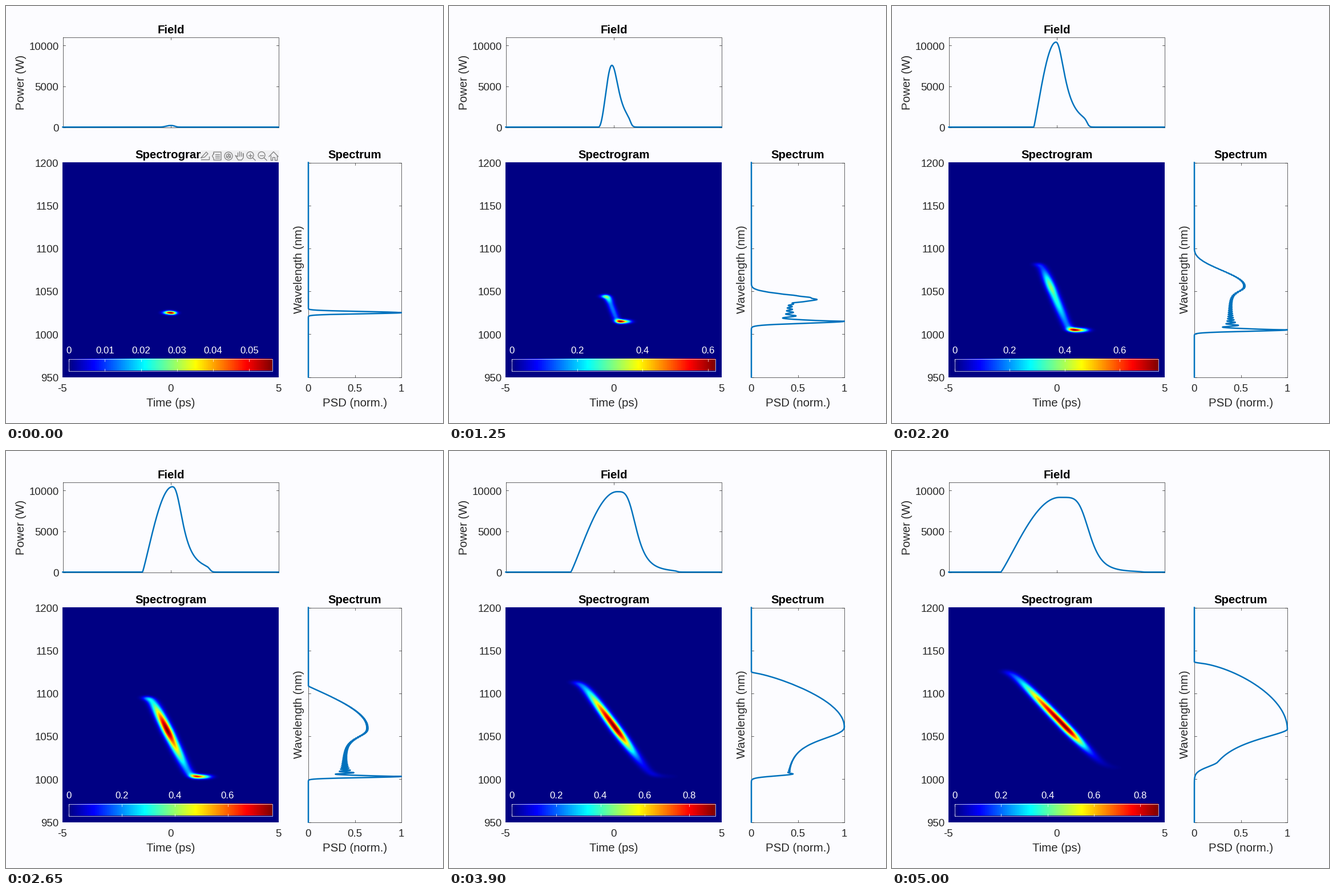
These frames come from a looping animation (766 px wide and 731 px high, 5.05 s). A matplotlib script:

```python
import numpy as np
import matplotlib.pyplot as plt
from matplotlib.animation import FuncAnimation
from matplotlib.colors import ListedColormap
from matplotlib.patches import Circle, Rectangle

W, H, DPI = 766, 731, 100
STEP, FRAMES = 50, 101
PX = 72 / DPI                      # points per pixel
BLUE, INK, PAPER, GREY = "#0072bd", "#262626", "#fcfcff", "#808080"
TICK, LABEL, SMALL = 18.6 * PX, 20.4 * PX, 16.8 * PX

L, R = 99.5, 477.5                 # time axis
TOP, BASE = 54.5, 212.5            # power axis
S_TOP, S_BASE = 274.5, 650.5       # wavelength axis
P_L, P_R = 530, 693                # spectrum axis
C_L, C_R, C_T, C_B = 110, 467, 618.5, 639.5

plt.rcParams["font.family"] = "Liberation Sans"

level = (np.arange(256) + 1) / 256
JET = ListedColormap(np.clip(1.5 - abs(4 * level[:, None] - [3, 2, 1]), 0, 1))


# ---- helpers ----------------------------------------------------------------
def track(t, *keys):
    """Smooth monotone path through a few (second, value) keys."""
    x, y = np.array(keys, float).T
    h = np.diff(x)
    s = np.diff(y) / h
    a, b = s[:-1], s[1:]
    same = a * b > 0
    m = np.r_[s[0], np.where(same, 2 * a * b / np.where(same, a + b, 1), 0), s[-1]]
    i = min(np.searchsorted(x, t, side="right"), len(h)) - 1
    f = (t - x[i]) / h[i]
    return ((1 + 2 * f) * (1 - f) ** 2 * y[i] + f * (1 - f) ** 2 * h[i] * m[i]
            + f * f * (3 - 2 * f) * y[i + 1] + f * f * (f - 1) * h[i] * m[i + 1])


def rise(x, foot, peak, power):
    """Quarter sine from 0 at the foot to 1 at the peak."""
    return np.sin(np.pi / 2 * np.clip((x - foot) / (peak - foot), 0, 1)) ** power


def fall(x, peak, half, power):
    return 1 / (1 + (np.maximum(x - peak, 0) / half) ** power)


def soft_max(a, b, c):
    return c * np.logaddexp(a / c, b / c)


def smooth(v, n):
    k = np.hanning(n)
    return np.convolve(v, k / k.sum(), "same")


# ---- the pulse --------------------------------------------------------------
grid_x = np.arange(99, 478) + .5
grid_y = np.arange(274, 651) + .5
time_x = np.linspace(L, R, 1200)
wave_y = np.linspace(S_TOP, S_BASE, 1505)
ridge_x = np.linspace(180, 400, 441)


def blue_edge(t):
    return track(t, (0, 537.5), (.75, 542), (1.7, 562.5), (2.65, 570.5), (3.25, 572), (5, 545))


def power(t):
    """Pulse shape in time: steep leading side, long trailing side."""
    foot = 262 - 20.6 * max(t - 1.55, 0)
    peak = track(t, (0, 288.5), (1.7, 285), (3.25, 295), (5, 294))
    bend = 1.1 + 3.9 * max(1 - t / 1.7, 0)
    half = 9 + 4.5 * t + 12 * max(t - 3.2, 0)
    steep = track(t, (0, 3.2), (1.7, 2), (5, 5))
    end = 300 + 15 * t + 19 * max(t - 1.7, 0)
    v = rise(time_x, foot, peak, bend) * fall(time_x, peak, half, steep)
    v = smooth(v / (1 + np.exp(np.clip((time_x - end) / 2, -50, 50))), 9)
    return v / v.max()


def psd(t):
    """Red dome, flat middle and a fringed spike at the blue edge."""
    foot = track(t, (0, 528), (.75, 515), (1.7, 440), (3.25, 400), (5, 371))
    peak = track(t, (0, 537.5), (.75, 532.5), (1.7, 498), (3.25, 482), (5, 488))
    bend = track(t, (0, 10), (.75, 11), (1.7, 6), (2.65, 1), (5, .6))
    dome = track(t, (0, 1), (.75, .95), (1.7, .49), (2.65, .64), (3.25, 1), (5, 1))
    floor = track(t, (0, 1), (.75, .42), (2.65, .38), (3.25, .5), (3.9, .36), (5, 0))
    half = track(t, (0, 2.5), (.75, 2.5), (1.7, 6), (3.25, 26), (5, 29))
    steep = 3 - .8 * max(t - 3.25, 0)
    spike = track(t, (0, 0), (.75, .58), (2.65, .63), (3.25, .24), (3.9, .05), (5, 0))
    period = max(9.5 - 3 * max(t - 1.7, 0), 4.5)
    blur = track(t, (0, 1.9), (.75, 3.6), (3.25, 1.7), (5, 10))
    edge = blue_edge(t)

    d = np.maximum(edge - wave_y, 0)
    wave = (np.cos(2 * np.pi * (d / period) ** 1.4) + .3) / 1.3
    v = floor + (dome - floor) * fall(wave_y, peak, half, steep) + spike * wave / (1 + .7 * d)
    v = v * smooth(rise(wave_y, foot, peak, bend), 17)
    v = v * np.exp(-.5 * (np.maximum(wave_y - edge, 0) / blur) ** 2)
    return v / v.max()


def density(t, field, spec):
    """Blobs along the chirp line, weighted by power and spectrum."""
    mid = track(t, (0, 526), (.75, 526), (1.7, 520), (2.65, 492), (5, 463))
    slope = track(t, (0, 2.6), (1.7, 2.6), (3.25, 1.6), (5, 1.04))
    head = track(t, (0, 537.5), (.75, 531), (1.7, 481), (2.65, 432), (5, 384))
    tail = blue_edge(t) + .5 + 6 * max(t - 3.25, 0)
    c = .3 + .05 * (tail - head)
    y = -soft_max(-(mid + slope * (ridge_x - 284)), -tail, c)
    y = soft_max(y, head, c)

    weight = (np.interp(ridge_x, time_x, field) * np.interp(y, wave_y, spec)
              * (.5 + .1 * np.gradient(y)))
    sx, sy = min(3 + 1.3 * t, 6.3), 2.1 + .18 * t
    gx = np.exp(-.5 * ((grid_x[None] - ridge_x[:, None]) / sx) ** 2)
    gy = np.exp(-.5 * ((grid_y[:, None] - y[None]) / sy) ** 2)
    z = (gy * weight) @ gx
    return z / z.max()


# ---- stage ------------------------------------------------------------------
fig = plt.figure(figsize=(W / DPI, H / DPI), dpi=DPI, facecolor=PAPER)
ax = fig.add_axes([0, 0, 1, 1])
ax.axis("off")


def text(x, y, s, size=TICK, ha="center", color=INK, **kw):
    return ax.text(x, y, s, fontsize=size, ha=ha, va="baseline", color=color, **kw)


def line(xs, ys, color=INK, width=.7, **kw):
    return ax.plot(xs, ys, color=color, lw=width * PX, **kw)[0]


def box(x0, y0, x1, y1, color=INK, **kw):
    line([x0, x1, x1, x0, x0], [y0, y0, y1, y1, y0], color, **kw)


def x_tick(x, top, bottom):
    line([x, x], [top, top + 4])
    line([x, x], [bottom, bottom - 4])


def y_tick(y, left, right, label):
    line([left, left + 4], [y, y])
    line([right, right - 4], [y, y])
    text(92.5, y + 7.3, label, ha="right")


def title(x, y, s):
    text(x, y, s, LABEL, color="black", weight="bold")


def side_label(x, y, s):
    text(x, y, s, LABEL, rotation=90, rotation_mode="anchor")


spectrogram = ax.imshow(np.zeros((377, 379)), cmap=JET, vmin=0, vmax=1, aspect="auto",
                        extent=(99, 478, 651, 274), interpolation="nearest")
ax.imshow(np.linspace(0, 1, 256)[None], cmap=JET, aspect="auto",
          extent=(C_L, C_R, C_B, C_T), interpolation="nearest", zorder=1)
ax.set_xlim(0, W)
ax.set_ylim(H, 0)

box(L, TOP, R, BASE)
x_tick(288.5, TOP, BASE)
for watts in (0, 5000, 10000):
    y_tick(BASE - watts * 71.6 / 5000, L, R, str(watts))

box(P_L, S_TOP, P_R, S_BASE)
x_tick(611.5, S_TOP, S_BASE)
for nm in range(950, 1201, 50):
    y_tick(S_BASE - (nm - 950) * 1.504, P_L, P_R, str(nm))

for x, s in ((98.5, "-5"), (288.7, "0"), (477.5, "5"), (529.5, "0"), (611.5, "0.5"), (693, "1")):
    text(x, 676.3, s)
title(289, 47.8, "Field")
title(288.7, 267.2, "Spectrogram")
title(611.5, 267.2, "Spectrum")
text(289, 702, "Time (ps)", LABEL)
text(611.5, 702, "PSD (norm.)", LABEL)
side_label(32.3, 133.5, "Power (W)")
side_label(519.3, 462, "Wavelength (nm)")

box(C_L, C_T, C_R, C_B, "white", zorder=2)
bar_ticks = line([], [], "white", zorder=2)
bar_labels = [text(C_L, 608.8, "", SMALL, color="white") for _ in range(7)]

field_line = line([], [], BLUE, 2.5, zorder=3, solid_joinstyle="round")
spec_line = line([], [], BLUE, 2.5, zorder=3, solid_joinstyle="round")


def toolbar():
    """Grey strip of seven small icons."""
    parts = [ax.add_patch(Rectangle((341, 253), 138, 20, fc="#f0f0f2", ec="none", zorder=5))]

    def stroke(*pts):
        parts.append(line(*zip(*pts), GREY, 1.3, zorder=6))

    def ring(x, y, r):
        parts.append(ax.add_patch(Circle((x, y), r, fill=False, ec=GREY, lw=1.3 * PX, zorder=6)))

    # export
    stroke((342, 266), (351, 256), (354, 259), (348, 265), (342, 266))
    stroke((342, 269), (356, 269), (356, 264))
    # data tip
    stroke((364, 259), (364, 256), (377, 256), (377, 270), (364, 270), (364, 267), (361.5, 263), (364, 259))
    for y in (260, 263, 266):
        stroke((367, y), (374, y))
    # rotate
    ring(390, 263, 7)
    a = np.radians(np.arange(30, 391, 60))
    stroke(*zip(390 + 4 * np.cos(a), 263 + 4 * np.sin(a)))
    for k in (0, 2, 4):
        stroke((390, 263), (390 + 4 * np.cos(a[k]), 263 + 4 * np.sin(a[k])))
    # hand
    for x, y in ((406, 257), (409, 255), (412, 256), (415, 258)):
        stroke((x, y), (x, 263))
    stroke((406, 264), (402, 262), (407, 270), (413, 270), (416, 266), (416, 259))
    # zoom in and out
    for x in (428, 448):
        ring(x, 261.5, 6)
        stroke((x + 4.3, 266), (x + 9, 270.5))
        stroke((x - 3, 261.5), (x + 3, 261.5))
    stroke((428, 258.5), (428, 264.5))
    # home
    stroke((461, 264), (469, 255.5), (477, 264))
    stroke((463.5, 262), (463.5, 270), (467, 270), (467, 265), (471, 265), (471, 270),
           (474.5, 270), (474.5, 262))
    return parts


tools = toolbar()


def scale_bar(peak):
    step = next(s for s in (.01, .02, .05, .1, .2) if peak / s <= 6)
    xs, ys = [], []
    for k, label in enumerate(bar_labels):
        v = k * step
        label.set_visible(v <= peak)
        if v > peak:
            continue
        x = C_L + (C_R - C_L) * v / peak
        label.set_text(f"{round(v, 4):g}")
        label.set_x(x)
        xs += [x, x, np.nan, x, x, np.nan]
        ys += [C_T, C_T + 4, np.nan, C_B, C_B - 4, np.nan]
    bar_ticks.set_data(xs, ys)


def update(i):
    t = i * STEP / 1000
    height = track(t, (0, 2.8), (.55, 37), (.75, 60.8), (1.1, 95), (1.7, 139.3), (2.4, 150), (5, 131))
    field, spec = power(t), psd(t)
    field_line.set_data(time_x, BASE - .2 - height * field)
    spec_line.set_data(P_L + (P_R - P_L) * spec, wave_y)
    spectrogram.set_data(density(t, field, spec))
    scale_bar(track(t, (0, .0564), (.75, .4716), (1.7, .705), (2.65, .769), (3.9, .918), (5, .878)))
    for part in tools:
        part.set_visible(i == 0)
    return []


anim = FuncAnimation(fig, update, frames=FRAMES, interval=STEP, init_func=lambda: update(0),
                     repeat=True, repeat_delay=0, blit=False)
plt.show()
```
